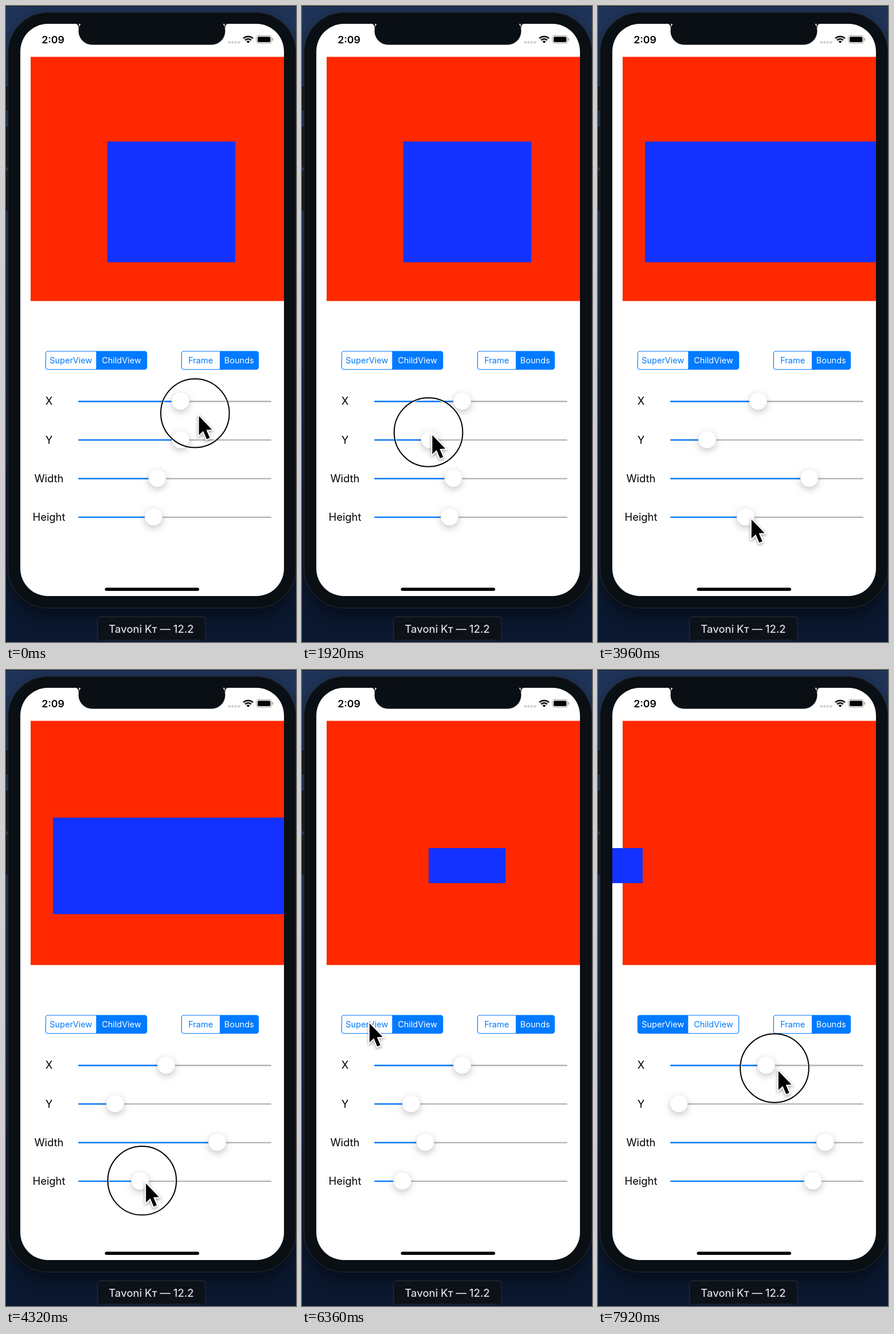
An HTML page with a canvas for the animation above (8 s loop, 506 by 1107 pixels).

```html
<!DOCTYPE html>
<html lang="en">
<head>
<meta charset="utf-8">
<title>Frame and bounds</title>
<style>
html, body { margin: 0; width: 100%; height: 100%; overflow: hidden; background: #0a1628; }
canvas { display: block; width: 506px; height: 1107px; }
</style>
</head>
<body>
<canvas id="stage"></canvas>
<script>
const W = 506, H = 1107, LOOP = 8000, STEP = 120;
const BLUE = '#007aff', BODY = '#0a0f14';
const FONT = 'Inter, "Open Sans", sans-serif';
const ROWS = ['X', 'Y', 'Width', 'Height'];
const MIN = 141;      // thumb centre at value 0
const SCALE = 1.815;  // view pixels per slider pixel
const rowY = i => 688.2 + 67.2 * i;

const canvas = document.getElementById('stage');
const ctx = canvas.getContext('2d');
const dpr = window.devicePixelRatio || 1;
canvas.width = W * dpr;
canvas.height = H * dpr;
ctx.scale(dpr, dpr);

// One press and drag along a row; dx, dy is where the pointer grips the thumb.
const drag = (view, row, start, end, from, to, dx, dy) =>
  ({ view, row, start, end, from, to, dx, dy });

const tap = drag('none', -1, 6480, 6600, 117, 117, 0, -8);
const drags = [
  drag('child', 0, -120, 720, 308.5, 279.5, 31.5, 23.5),
  drag('child', 1, 1320, 2160, 304.5, 190.5, 3.5, -10.5),
  drag('child', 2, 2580, 3480, 264, 368.5, 21.5, -1.6),
  drag('child', 3, 4080, 4920, 257.5, 175, 9.5, 2),
  drag('child', 2, 5400, 6000, 368.5, 215, 8.5, 3),
  tap,
  drag('super', 0, 7200, 7920, MIN, 293.5, 20.5, 7.8)
];

const clamp = v => Math.min(1, Math.max(0, v));
const mix = (a, b, p) => a + (b - a) * p;
const ease = p => p * p * (3 - 2 * p);

const thumbX = (d, t) => mix(d.from, d.to, clamp((t - d.start) / (d.end - d.start)));
const grip = (d, t) => [thumbX(d, t) + d.dx, rowY(d.row) + d.dy];

function sliders(t) {
  const views = { child: [308.5, 304.5, 264, 257.5], super: [MIN, MIN, 396.5, 375], none: [] };
  for (const d of drags) if (t > d.start) views[d.view][d.row] = thumbX(d, t);
  return views;
}

// Follows the thumb while dragging, then glides to the next grip just before its press.
function pointerAt(t) {
  const i = drags.findLastIndex(d => t > d.start);
  const d = drags[i], next = drags[i + 1] || d;
  const p = next === d ? 0 : ease(clamp((t - d.end) / (next.start - STEP - d.end)));
  const a = grip(d, t), b = grip(next, t);
  return { x: mix(a[0], b[0], p), y: mix(a[1], b[1], p), down: t <= d.end };
}

function rect(x, y, w, h, color) {
  ctx.fillStyle = color;
  ctx.fillRect(x, y, w, h);
}

function round(x, y, w, h, r, fill, stroke, line = 1) {
  ctx.beginPath();
  ctx.roundRect(x, y, w, h, r);
  if (fill) { ctx.fillStyle = fill; ctx.fill(); }
  if (stroke) { ctx.strokeStyle = stroke; ctx.lineWidth = line; ctx.stroke(); }
}

function circle(x, y, r, fill, stroke, line) {
  round(x - r, y - r, 2 * r, 2 * r, r, fill, stroke, line);
}

function text(str, x, y, size, color, weight = 400) {
  ctx.font = `${weight} ${size}px ${FONT}`;
  ctx.textAlign = 'center';
  ctx.fillStyle = color;
  ctx.fillText(str, x, y);
}

function shaded(color, blur, y, paint) {
  ctx.save();
  ctx.shadowColor = color;
  ctx.shadowBlur = blur * dpr;
  ctx.shadowOffsetY = y * dpr;
  paint();
  ctx.restore();
}

function backdrop() {
  const g = ctx.createLinearGradient(0, 0, 0, H);
  ['#1f3459', '#2b4874', '#1c3155', '#0f2040', '#0a1830'].forEach((c, i) => g.addColorStop(i / 4, c));
  rect(0, 0, W, H, g);
  rect(0, 0, W, 1, '#141d2e');
  for (const [y, h] of [[141, 40], [211, 69], [288, 68]]) {
    round(-6, y, 10, h, 2, '#1c1d1f', '#0b0d10');
  }
}

function phone() {
  shaded('rgba(0,0,0,.6)', 40, 14, () => round(3.5, 11, 502.5, 1037, 70, BODY));
  round(3.5, 11, 502.5, 1037, 70, null, '#2a2f34');
  round(25, 31, 460, 996, 48, '#fff');
}

function notch() {
  round(126.5, 20, 256, 47.5, 25, BODY);
  for (const [x, dir] of [[126.5, -1], [382.5, 1]]) {
    ctx.beginPath();
    ctx.moveTo(x - dir, 30.5);
    ctx.lineTo(x + dir * 6, 30.5);
    ctx.quadraticCurveTo(x, 31, x, 38);
    ctx.lineTo(x - dir, 42);
    ctx.fill();
  }
}

function statusBar() {
  text('2:09', 82, 65, 17.7, '#000', 600);
  for (let i = 0; i < 4; i++) circle(389.7 + i * 5.5, 63.3, 2.1, '#c9c9c9');
  const wedge = r => ctx.arc(422.5, 64.8, r, -Math.PI * 0.75, -Math.PI * 0.25);
  for (const r of [7.5, 11.8]) {
    ctx.beginPath();
    wedge(r);
    ctx.lineWidth = 2.5;
    ctx.strokeStyle = '#000';
    ctx.stroke();
  }
  ctx.beginPath();
  ctx.moveTo(422.5, 64.8);
  wedge(4.3);
  ctx.fillStyle = '#000';
  ctx.fill();
  round(437, 51.5, 26.5, 13.5, 3.8, null, '#9a9a9a', 1.1);
  round(439, 53.5, 22.5, 9.5, 2.2, '#000');
  round(464.5, 56, 1.6, 4.5, 1, '#9a9a9a');
}

function segments(edges, names, active) {
  const y = 601, h = 31.5, [x, , right] = edges;
  ctx.save();
  ctx.beginPath();
  ctx.roundRect(x, y, right - x, h, 4);
  ctx.clip();
  rect(edges[active], y, edges[active + 1] - edges[active], h, BLUE);
  ctx.restore();
  round(x, y, right - x, h, 4, null, BLUE, 1.2);
  names.forEach((name, i) => {
    text(name, (edges[i] + edges[i + 1]) / 2, 622, 14.5, i === active ? '#fff' : BLUE);
  });
}

function slider(name, y, x) {
  text(name, 75, y + 6.2, 18.4, '#000');
  round(126, y - 1.1, 337, 2.3, 1.1, '#b3b3b3');
  round(126, y - 1.1, x - 126, 2.3, 1.1, BLUE);
  shaded('rgba(0,0,0,.22)', 12, 4, () => circle(x, y - 0.8, 15.5, '#fff'));
  circle(x, y - 0.8, 15.5, null, 'rgba(0,0,0,.09)', 0.6);
}

function pointer({ x, y, down }) {
  if (down) {
    circle(x - 6, y - 3, 58.3, null, '#fff', 1.5);
    circle(x - 6, y - 3, 59.8, null, '#000', 2);
  }
  const shape = [[0.8, 2], [0.8, 35], [8.3, 28], [14.3, 42.3], [19.7, 40], [13.7, 26], [23.5, 25.5]];
  ctx.beginPath();
  for (const [dx, dy] of shape) ctx.lineTo(x + dx, y + dy);
  ctx.closePath();
  ctx.miterLimit = 3;
  ctx.lineWidth = 4;
  ctx.strokeStyle = '#fff';
  shaded('rgba(0,0,0,.4)', 5, 2, () => ctx.stroke());
  ctx.fillStyle = '#000';
  ctx.fill();
}

function views(child, parent) {
  const size = i => (child[i] - MIN) * SCALE;
  const w = size(2), h = size(3) * 0.995;
  const shift = (parent[0] - MIN) * SCALE;
  ctx.save();
  ctx.beginPath();
  ctx.rect(25, 31, 460, 996);
  ctx.clip();
  rect(43, 88.5, 463, 425, '#ff2800');
  rect(Math.round(288.4 - shift - w / 2), Math.round(341 - h / 2), Math.round(w), Math.round(h), '#1432ff');
  ctx.restore();
}

function draw(t) {
  const state = sliders(t);
  const parentOn = t >= tap.end;
  const shown = parentOn ? state.super : state.child;

  backdrop();
  phone();
  views(state.child, state.super);
  notch();
  statusBar();
  segments([69.3, 157.3, 245.7], ['SuperView', 'ChildView'], parentOn ? 0 : 1);
  segments([306.3, 373, 440.5], ['Frame', 'Bounds'], 1);
  ROWS.forEach((name, i) => slider(name, rowY(i), shown[i]));
  round(172.5, 1012.5, 164.5, 5.5, 2.75, '#000');
  round(159.5, 1063, 188.5, 41, 5, '#0d1219', '#2b3038');
  text('Tavoni Kᴛ — 12.2', 253.5, 1091, 18.4, '#d9dbde', 500);
  pointer(pointerAt(t));
}

function tick(now) {
  draw(Math.floor(now % LOOP / STEP) * STEP);
  requestAnimationFrame(tick);
}
draw(0);
requestAnimationFrame(tick);
</script>
</body>
</html>
```
